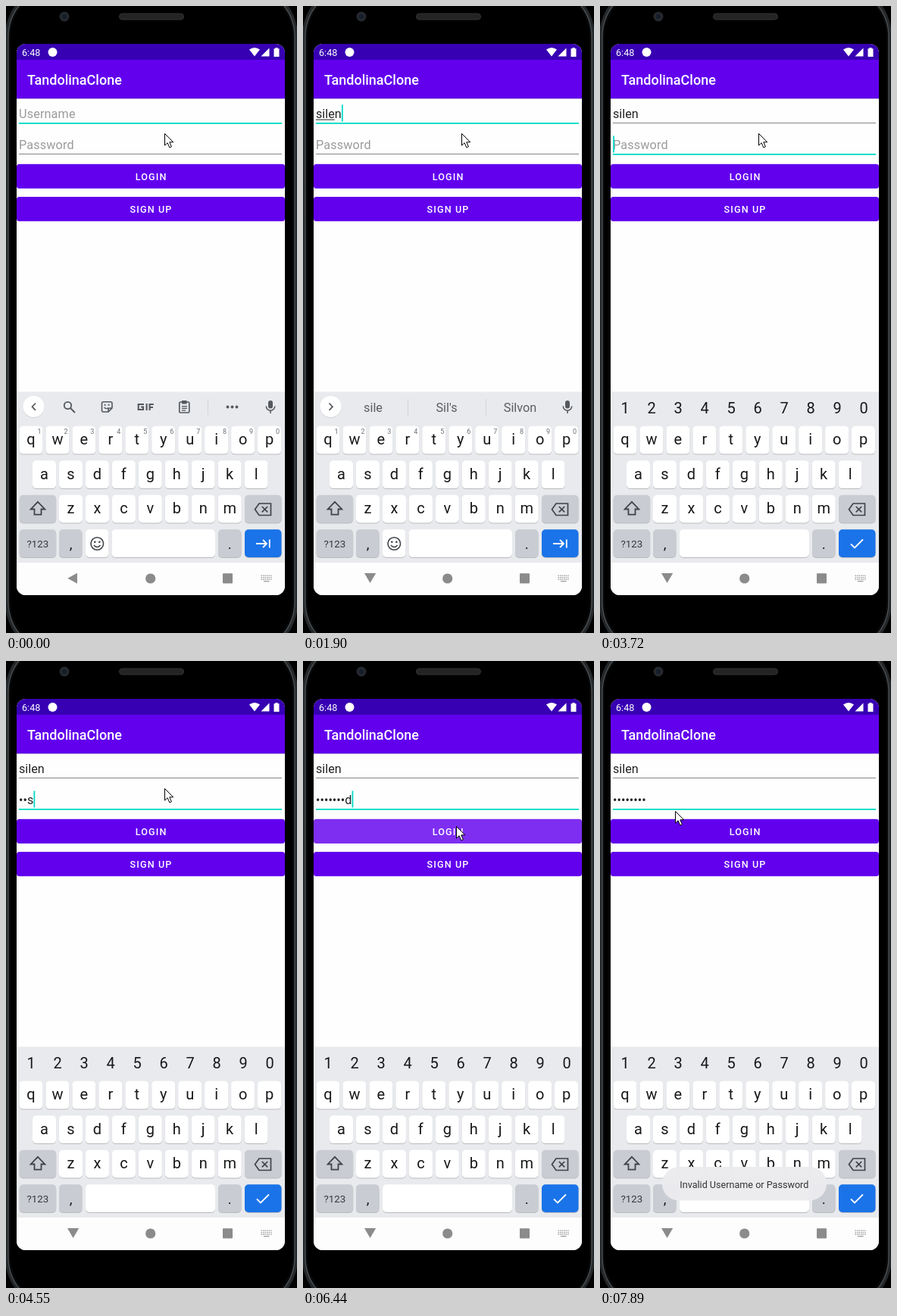
Recreate the animation shown at these times as an HTML page with a canvas. Size 384 by 828 pixels, loop 8 s.

```html
<!DOCTYPE html>
<html lang="en">
<head>
<meta charset="utf-8">
<title>Login screen</title>
<style>
html, body { margin: 0; width: 100%; height: 100%; overflow: hidden; background: #000; }
canvas { display: block; width: 384px; height: 828px; }
</style>
</head>
<body>
<canvas id="stage" width="384" height="828"></canvas>
<script>
const ctx = document.getElementById('stage').getContext('2d');
const LOOP = 8000;
const PURPLE = '#6200ee', TEAL = '#03dac5', ICON = '#55595e', KEY_TEXT = '#17181a';
const KEY_GREY = '#c9ccd3', BOARD = '#e8eaed', NAV = '#8b8b8b';
const ROWS = [554.8, 600.3, 645.7, 691.2];

// Each timeline row: start time, then values held until the next row.
const userSteps = [[0, ''], [680, 's'], [950, 'si'], [1070, 'sil'], [1780, 'sile'], [1900, 'silen']];
const markSteps = [[0, ''], [830, 's'], [1070, 'si'], [1350, 'sil'], [1900, 'sile'], [2180, 'silen'], [2710, '']];
const passSteps = [[0, ''], [4280, 'p'], [4400, '•a'], [4550, '••s'], [4830, '••••w'],
  [4980, '•••••o'], [5100, '••••••r'], [5250, '•••••••d'], [6680, '••••••••']];
const caretSteps = [[0, 0], [400, 1], [3290, 0], [3720, 1], [5780, 0], [6320, 1], [6680, 0], [7220, 1], [7740, 0]];
const hintSteps = [[830, 's', 'so', 'She'], [1070, 'si', 'six', 'Sir'], [1350, 'sil', 'Silk', 'Silo'],
  [1900, 'sile', "Sil's", 'Silvon'], [2180, 'silen', 'Silenu', "Silenu's"]];
const pointerSteps = [[0, 209, 168], [5780, 204, 193], [5900, 203.5, 203], [6050, 203, 216], [6200, 202, 218],
  [6560, 203, 290], [6680, 212, 465], [6830, 245, 600], [6950, 262, 676], [7100, 272, 691],
  [7370, 240, 572], [7490, 196, 430], [7740, 155, 272], [7890, 99, 198]];
const rippleSteps = [[0, 0, 0], [6200, 70, .18], [6320, 190, .18], [6440, 400, .18], [6560, 400, .09], [6680, 0, 0]];
const toastSteps = [[0, 0], [6680, .45], [6830, .85], [6950, 1]];

function at(steps, t) {
  let row = steps[0];
  for (const s of steps) if (t >= s[0]) row = s;
  return row.slice(1);
}

function rect(x, y, w, h, fill) {
  ctx.fillStyle = fill;
  ctx.fillRect(x, y, w, h);
}

function round(x, y, w, h, r, fill, stroke, lw = 1) {
  ctx.beginPath();
  ctx.roundRect(x, y, w, h, r);
  if (fill) { ctx.fillStyle = fill; ctx.fill(); }
  if (stroke) { ctx.strokeStyle = stroke; ctx.lineWidth = lw; ctx.stroke(); }
}

function disc(x, y, r, fill, stroke, lw) {
  round(x - r, y - r, 2 * r, 2 * r, r, fill, stroke, lw);
}

function shape(d, fill, stroke, lw = 1.8) {
  const p = new Path2D(d);
  if (fill) { ctx.fillStyle = fill; ctx.fill(p); }
  if (stroke) { ctx.strokeStyle = stroke; ctx.lineWidth = lw; ctx.stroke(p); }
}

function text(s, x, y, size, color, { align = 'left', weight = 400, gap = 0 } = {}) {
  ctx.font = `${weight} ${size}px Roboto, sans-serif`;
  ctx.letterSpacing = gap + 'px';
  ctx.textAlign = align;
  ctx.fillStyle = color;
  ctx.fillText(s, align === 'center' ? x + gap / 2 : x, y);
  const w = ctx.measureText(s).width;
  ctx.letterSpacing = '0px';
  return w;
}

function drawPhone() {
  rect(0, 0, 384, 828, '#000');
  round(-1, -30, 386, 888, 70, '#25282a');
  round(3, -26, 378, 880, 67, '#08090a', '#4b4e50', 1.4);
  round(6, -22, 372, 872, 63, '#000');
  disc(77, 14, 6.5, '#25282c');
  disc(77, 14, 3, '#141d2b');
  round(149.5, 10, 85, 8, 4, '#242424', '#333');
}

function drawBars() {
  rect(14, 50, 354, 21.5, '#3700b3');
  rect(14, 71, 354, 51, PURPLE);
  rect(14, 122, 354, 1, '#b9a6d6');
  text('6:48', 21, 66, 12.6, '#fff');
  disc(61.5, 61, 6, '#fff');
  shape('M321 57.5Q328 52.5 335 57.5L328 66.5Z', '#fff');
  shape('M347.5 55.5V66.5H336.5Z', '#fff');
  shape('M355.5 55h3v1.3h2V67h-7V56.3h2Z', '#fff');
  text('TandolinaClone', 28, 104, 18, '#fff', { weight: 500 });
}

function drawField(label, value, base, focused, caret, mark) {
  if (!value) text(label, 17, base, 16.2, '#9b9b9b', { gap: .15 });
  const w = value ? text(value, 17, base, 16.2, '#222') : 0;
  if (mark) rect(17, base + 1.6, ctx.measureText(mark).width, 1, '#222');
  if (focused) rect(17, base + 6, 347, 1.8, TEAL);
  else rect(17, base + 6, 347, 1, '#858585');
  if (focused && caret) rect(17.2 + w, base - 17.5, 1.8, 22, TEAL);
}

function drawButton(label, y, ripple) {
  round(14, y, 354, 32.4, 3.6, PURPLE);
  if (ripple && ripple[1]) {
    ctx.save();
    ctx.beginPath();
    ctx.roundRect(14, y, 354, 32.4, 3.6);
    ctx.clip();
    disc(202, y + 9, ripple[0], `rgba(255,255,255,${ripple[1]})`);
    ctx.restore();
  }
  text(label, 191, y + 21, 12.6, '#fff', { align: 'center', weight: 500, gap: 1.125 });
}

function key(x, y, w, fill = '#fff', h = 36.8) {
  round(x, y + 1, w, h, 5, 'rgba(0,0,0,.2)');
  round(x, y, w, h, 5, fill);
}

function drawMic() {
  round(346, 521, 6, 10.5, 3, ICON);
  shape('M343.3 528.5a5.7 5.7 0 0 0 11.4 0M349 534.5v3.5', null, ICON, 1.6);
}

function drawTools() {
  disc(81.5, 527.5, 4.7, null, ICON, 1.8);
  shape('M85 531l6 6', null, ICON, 2);
  shape('M128.5 522.8h9.5q2 0 2 2v6.2l-5 5h-6.5q-2 0-2-2v-9.2q0-2 2-2ZM140 531h-3q-2 0-2 2v3', null, ICON, 1.6);
  disc(130.6, 526.8, 1.1, ICON);
  disc(135.6, 526.8, 1.1, ICON);
  shape('M129.5 530q3 3 5.5 .5', null, ICON, 1.3);
  shape('M182 526h-7.3v7h6.3v-3.5h-3M185.6 525v9M189.6 534v-8h5.2M189.6 530h4.4', null, ICON, 2.1);
  round(228.8, 523, 13, 14, 1.5, null, ICON, 1.7);
  rect(232, 521, 6.5, 4.5, ICON);
  for (const [y, w] of [[528, 7], [530.7, 7], [533.4, 5]]) rect(232, y, w, 1.3, ICON);
  rect(266, 519, 1, 21, '#d2d4d8');
  for (const x of [292.5, 298.5, 304.5]) disc(x, 529.5, 1.9, ICON);
}

function drawStrip(t) {
  const open = t >= 830;
  disc(36.5, 530, 14, 'rgba(0,0,0,.1)');
  disc(36.5, 529, 14, '#fff');
  shape(open ? 'M34.5 524.5l4.5 4.7-4.5 4.7' : 'M39 524.5l-4.5 4.7 4.5 4.7', null, ICON, 1.7);
  if (open) {
    at(hintSteps, t).forEach((s, i) => text(s, 92.5 + 97 * i, 536, 16.2, '#5a5d61', { align: 'center' }));
    for (const x of [138, 241]) rect(x, 519, 1, 22, '#d2d4d8');
  } else drawTools();
  drawMic();
}

function drawKeyboard(t) {
  const secret = t >= 2840;
  const center = { align: 'center' };
  rect(14, 509.5, 354, 226, BOARD);
  if (secret) [...'1234567890'].forEach((c, i) => text(c, 33 + 35 * i, 538, 20, KEY_TEXT, center));
  else drawStrip(t);

  [['qwertyuiop', 33], ['asdfghjkl', 50.5], ['zxcvbnm', 85.5]].forEach(([letters, x0], row) => {
    [...letters].forEach((c, i) => {
      const x = x0 + 34.95 * i;
      key(x - 15.5, ROWS[row], 31);
      text(c, x, ROWS[row] + 24.3, 20, KEY_TEXT, center);
      if (!row && !secret) text((i + 1) % 10, x + 11, 565, 9, '#6a6d72', center);
    });
  });

  key(17.7, ROWS[2], 48.5, KEY_GREY);
  shape('M42 654.8l9.3 9.7h-4.8v7.2h-9v-7.2h-4.8Z', null, '#3f4348', 1.8);
  key(315, ROWS[2], 48.5, KEY_GREY);
  shape('M334 657h15.5v15.5H334l-5.5-7.75ZM337.8 661l7.4 7.4M345.2 661l-7.4 7.4', null, '#3f4348', 1.7);

  const y = ROWS[3];
  key(17.7, y, 48.5, KEY_GREY);
  text('?123', 41.8, 715, 13.3, '#34383d', center);
  key(70, y, 30.5, KEY_GREY);
  text(',', 85.5, 717, 19, KEY_TEXT, center);
  key(280, y, 30.5, KEY_GREY);
  text('.', 295.3, 717, 19, KEY_TEXT, center);
  key(secret ? 105 : 139.5, y, secret ? 171 : 136.5);
  if (!secret) {
    key(105, y, 30.5);
    disc(120.3, 710, 8.3, null, '#3f4348', 1.6);
    disc(117.3, 707.8, 1.3, '#3f4348');
    disc(123.3, 707.8, 1.3, '#3f4348');
    shape('M116 712q4.3 5 8.6 0', null, '#3f4348', 1.6);
  }
  key(315, y, 48.5, '#1a73e8');
  shape(secret ? 'M331 710.5l5 5 11-11' : 'M330 710h13.5M339 705l5 5-5 5M347.8 704.5v11', null, '#fff', 1.8);
}

function drawNav(t) {
  rect(14, 735, 354, 43, '#fdfdfd');
  shape(t < 120 ? 'M94 748.8v14L81.3 755.8Z' : 'M81 749h15.2l-7.6 13Z', NAV);
  disc(190.7, 756, 6.6, NAV);
  round(286, 749.3, 13, 13.2, 1, NAV);
  for (let r = 0; r < 3; r++)
    for (let c = 0; c < 6; c++) rect(336.5 + c * 2.5, 751.5 + r * 2.5, 1.5, 1.5, '#a5a5a5');
  rect(340, 759, 7.5, 1.4, '#a5a5a5');
}

function drawToast(alpha) {
  if (!alpha) return;
  ctx.save();
  ctx.globalAlpha = alpha;
  round(82, 668, 217, 44.5, 22, 'rgba(236,236,239,.97)');
  text('Invalid Username or Password', 190.3, 696, 12.6, '#333', { align: 'center' });
  ctx.restore();
}

function drawPointer(x, y) {
  ctx.save();
  ctx.translate(x + .5, y + .5);
  shape('M0 0V15.6L3.6 12.2L6.3 18.4L8.9 17.3L6.3 11.3H11.2Z', '#fff', '#000', 1);
  ctx.restore();
}

function draw(t) {
  const onPass = t >= 2710;
  const [caret] = at(caretSteps, t);
  drawPhone();
  ctx.save();
  ctx.beginPath();
  ctx.roundRect(14, 50, 354, 728, 12);
  ctx.clip();
  rect(14, 50, 354, 728, '#fefefe');
  drawBars();
  drawField('Username', at(userSteps, t)[0], 148, !onPass, caret, at(markSteps, t)[0]);
  drawField('Password', at(passSteps, t)[0], 189, onPass, caret);
  drawButton('LOGIN', 208.7, at(rippleSteps, t));
  drawButton('SIGN UP', 251.9);
  drawKeyboard(t);
  drawNav(t);
  drawToast(at(toastSteps, t)[0]);
  ctx.restore();
  drawPointer(...at(pointerSteps, t));
}

function tick() {
  draw(performance.now() % LOOP);
  requestAnimationFrame(tick);
}
tick();
</script>
</body>
</html>
```
